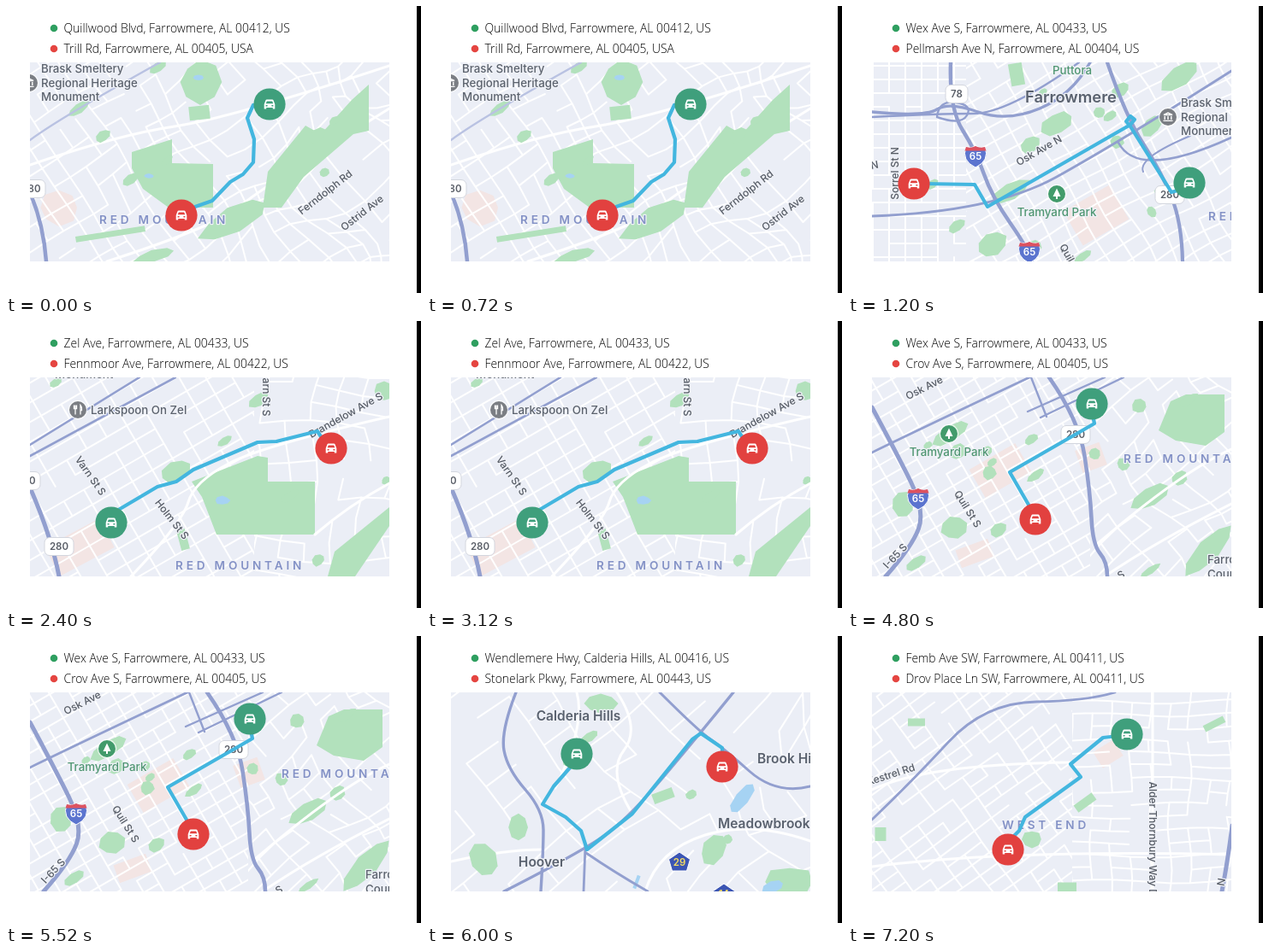
Animation, 485 px wide and 336 px high, one loop 8 s. Source, as an HTML page:

```html
<!DOCTYPE html>
<html lang="en">
<head>
<meta charset="utf-8">
<title>Trips</title>
<style>
  html, body { margin: 0; width: 100%; height: 100%; overflow: hidden; background: #fff; }
  svg { display: block; width: 100vw; height: 100vh; }
  .scene { visibility: hidden; }
  .scene.on { visibility: visible; }
  .head { font: 300 13.9px "Open Sans", sans-serif; fill: #000; }
  .label {
    font: 500 13.3px Inter, sans-serif; fill: #5b626d;
    paint-order: stroke; stroke: #eff1f7; stroke-width: 2.5px; stroke-linejoin: round;
  }
  .area { font-weight: 600; font-size: 13.6px; fill: #8391c6; letter-spacing: .28em; }
  .green { fill: #4f9672; }
  .town { font-weight: 600; font-size: 15.5px; fill: #59616e; }
  .city { font-weight: 600; font-size: 18.4px; fill: #59616e; }
  .street { font-size: 12px; fill: #555b65; text-anchor: middle; }
  .mid { text-anchor: middle; }
  .badge { font: 600 11.5px Inter, sans-serif; text-anchor: middle; }
  .line { fill: none; stroke-linejoin: round; stroke-linecap: round; }
</style>
</head>
<body>
<svg id="stage" viewBox="0 0 485 336">
  <defs>
    <clipPath id="frame"><path d="M28 66H448V299H28Z"/></clipPath>
    <path id="car" fill="#fff" fill-rule="evenodd" d="M-6.3 0L-4.6-4.4Q-4.2-5.4-3.2-5.4H3.2Q4.2-5.4 4.6-4.4L6.3 0V5.6H3.8V4H-3.8V5.6H-6.3ZM-4.3-.8H4.3L3.2-3.6H-3.2ZM-4.4 1V2.6H-2.4V1ZM2.4 1V2.6H4.4V1Z"/>
    <path id="tree" fill="#fff" d="M0-6.5L4.5 3H1V6H-1V3H-4.5Z"/>
    <path id="museum" fill="none" stroke="#fff" stroke-width="1.4" d="M-5-2.5L0-5L5-2.5ZM-3.8-1V3M0-1V3M3.8-1V3M-5.5 4.4H5.5"/>
    <path id="food" fill="none" stroke="#fff" stroke-width="1.3" d="M-4.5-5.5V-1.5H-1.5V-5.5M-3-5.5V5.5M3 5.5V-5.5Q5-3 4.5 .5H3"/>
    <path id="clinic" fill="none" stroke="#fff" stroke-width="1.4" d="M-4.5-5V-2Q-4.5 1-2.2 1T0-2V-5M-2.2 1Q-2 5 1.2 5T4 1V-3"/>
  </defs>
  <path d="M480 0H485V336H480Z"/>
</svg>
<script>
const LOOP = 8000, HOLD = 1200;
const PARK = '#b2e1bc', PINK = '#f3e5e4', WATER = '#a6d3f3', GREEN = '#3f9f7c', RED = '#e2413f';

function seeded(seed) {
  return () => {
    seed = Math.sin(seed * 12.9898 + 4.1) * 43758.5453;
    return seed -= Math.floor(seed);
  };
}

// Ground
const shape = (points, fill = PARK) => `<path fill="${fill}" d="M${points}Z"/>`;
const block = (x, y, w, h, turn = 0, fill = PARK) =>
  `<rect x="${-w / 2}" y="${-h / 2}" width="${w}" height="${h}" fill="${fill}" transform="translate(${x} ${y}) rotate(${turn})"/>`;
function blob(x, y, w, h, turn = 0, fill = PARK) {
  const rnd = seeded(x + y), pts = [];
  for (let a = 0; a < 8; a++) {
    const r = .5 + .12 * rnd(), t = a * Math.PI / 4;
    pts.push([w * r * Math.cos(t), h * r * Math.sin(t)].map(v => v.toFixed(1)));
  }
  return `<g transform="translate(${x} ${y}) rotate(${turn})">${shape(pts.join(' '), fill)}</g>`;
}
function groves(count, seed, turn = -35) {
  const rnd = seeded(seed);
  return Array.from({ length: count }, () =>
    blob(28 + 420 * rnd(), 66 + 233 * rnd(), 9 + 16 * rnd(), 6 + 9 * rnd(), turn)).join('');
}

// Lattice of streets whose bends grow towards the right, with some blocks left open.
function streets(turn, dx, dy, { keep = .88, bend = 0, from = 28, to = 448 } = {}) {
  const rnd = seeded(dx + dy + turn), cos = Math.cos(turn * Math.PI / 180), sin = Math.sin(turn * Math.PI / 180);
  const at = (i, j) => {
    const u = i * dx, v = j * dy, x = 238 + u * cos - v * sin, y = 182 + u * sin + v * cos;
    const k = bend * Math.max(0, x - 28) / 420;
    return (x + k * Math.sin(j * .9 + i * .4)).toFixed(1) + ' ' + (y + k * Math.sin(i * .8 - j * .5)).toFixed(1);
  };
  const nx = Math.ceil(250 / dx), ny = Math.ceil(250 / dy);
  let d = '';
  for (let i = -nx; i < nx; i++) for (let j = -ny; j < ny; j++) {
    if (rnd() < keep) d += `M${at(i, j)}L${at(i + 1, j)}`;
    if (rnd() < keep) d += `M${at(i, j)}L${at(i, j + 1)}`;
  }
  return `<svg x="${from}" y="66" width="${to - from}" height="233" viewBox="${from} 66 ${to - from} 233">
    <path class="line" stroke="#fff" stroke-width="2" d="${d}"/></svg>`;
}

// Lines; roads round off their key points.
const stroke = (d, color, w) => `<path class="line" stroke="${color}" stroke-width="${w}" d="${d}"/>`;
function road(points, w = 3.4, color = '#929fcf') {
  const p = points.split(' ').map(s => s.split(',').map(Number));
  let d = 'M' + p[0];
  for (let i = 1; i < p.length - 1; i++) {
    const k = i < p.length - 2 ? .5 : 1;
    d += `Q${p[i]} ${p[i].map((v, n) => v + (p[i + 1][n] - v) * k)}`;
  }
  return stroke(p.length > 2 ? d : 'M' + points, color, w);
}
const lane = points => road(points, 3, '#fff');
const route = points => stroke('M' + points, '#43b6df', 4.2);

// Text and signs
const label = (x, y, text, kind = '') => text.split('|').map((row, i) =>
  `<text class="label ${kind}" x="${x}" y="${y + i * 16.7}">${row}</text>`).join('');
const street = (x, y, turn, text) =>
  `<text class="label street" y="4.3" transform="translate(${x} ${y}) rotate(${turn})">${text}</text>`;
const disc = (x, y, r, fill, icon) =>
  `<g transform="translate(${x} ${y})"><circle r="${r}" fill="${fill}"/><use href="#${icon}"/></g>`;
const pin = ([x, y], fill) => disc(x, y, 18.6, fill, 'car');
const poi = (x, y, icon) => `<circle cx="${x}" cy="${y}" r="11.2" fill="#fff" opacity=".7"/>` +
  disc(x, y, 10, icon === 'tree' ? '#429b6b' : '#7b7e84', icon);
const garden = (x, y) => poi(x, y, 'tree') + label(x, y + 25.5, 'Tramyard Park', 'mid green');
const clinic = (x, y, text) => poi(x, y, 'clinic') + label(x, y + 25.5, text, 'mid');
const badge = (x, y, text, fill, back) =>
  `<g transform="translate(${x} ${y})">${back}<text class="badge" y="4.2" fill="${fill}">${text}</text></g>`;
const highway = (x, y, text) => {
  const w = text.length * 4 + 5;
  return badge(x, y, text, '#5a5f68',
    `<rect x="${-w}" y="-10.5" width="${2 * w}" height="21" rx="6" fill="#fff" stroke="#d3d6de"/>`);
};
const interstate = (x, y) => badge(x, y + 1, '65', '#fff',
  '<path fill="#5b74cf" stroke="#fff" d="M-11-11Q-5-9 0-12Q5-9 11-11Q17 5 0 13Q-17 5-11-11Z"/>' +
  '<path fill="#dd5260" d="M-11-11Q-5-9 0-12Q5-9 11-11L12.5-6.5H-12.5Z"/>');
const county = (x, y, text) => badge(x, y, text, '#f4dc62',
  '<path fill="#3c56b4" stroke="#fff" d="M0-12L12.5-3.5L8.5 10H-8.5L-12.5-3.5Z"/>');

const scenes = [
  {
    from: 'Quillwood Blvd, Farrowmere, AL 00412, US', to: 'Trill Rd, Farrowmere, AL 00405, USA',
    start: [308, 115], end: [205, 245],
    way: '289,116 282,131 290,156 289,183 277,197 262,206 241,228 221,235',
    map: [
      blob(62, 236, 40, 36, 0, PINK), streets(-33, 21, 25, { keep: .74, bend: 15 }),
      lane('28,186 134,150 260,132 448,70'), lane('118,299 245,258 300,212 448,120'),
      shape('147,171 194,156 194,184 242,185 242,236 190,236 160,214 147,190'),
      blob(227, 89, 42, 44), block(226, 125, 24, 16, -6),
      shape('424,92 424,146 406,150 348,200 322,236 300,236 306,194 350,140 368,150 404,110'),
      blob(266, 250, 78, 26, -28), block(122, 267, 82, 7, -9), blob(172, 293, 42, 12, -15),
      groves(8, 5), blob(225, 84, 11, 6, 0, WATER), blob(167, 199, 10, 5, 0, WATER),
      road('28,157 63,131 180,66', 2.4, '#b9c2e2'), road('28,218 44,256 47,299', 4.5),
      highway(33, 214, '80'), poi(27, 90, 'museum'), label(41, 78, 'Brask Smeltery|Regional Heritage|Monument'),
      label(109, 255, 'RED MOUNTAIN', 'area'), street(373, 218, -38, 'Ferndolph Rd'), street(416, 242, -38, 'Ostrid Ave')
    ]
  },
  {
    from: 'Wex Ave S, Farrowmere, AL 00433, US', to: 'Pellmarsh Ave N, Farrowmere, AL 00404, US',
    start: [399, 207], end: [77, 208],
    way: '392,214 378,218 330,141 325,135 330,129 335,133 330,139 163,235 148,209 88,208',
    map: [
      block(290, 245, 62, 46, -30, PINK), streets(0, 19, 16, { to: 138 }), streets(-30, 23, 18, { from: 138, bend: 4 }),
      blob(244, 138, 34, 22, -28), blob(190, 217, 44, 18, -30), blob(168, 279, 34, 24, -30),
      block(197, 80, 16, 26, -10), blob(388, 82, 48, 20, -38), blob(356, 140, 28, 16, -50), groves(12, 8),
      road('28,124 90,130 118,112 186,136 262,104 283,66'), road('28,130 106,126 186,126 270,66', 2.4),
      road('104,130 106,110 146,116 132,140 104,130', 2.4), road('120,66 118,120 150,171 168,223 211,285 215,299', 4.4),
      road('28,246 170,241 316,160 448,76', 2.8), road('316,160 339,204 448,154', 2.6), road('345,194 338,178 400,152', 2),
      road('303,66 325,130 366,194 390,253 391,299', 4.2),
      highway(127, 103, '78'), interstate(149, 175), interstate(212, 287), highway(376, 221, '280'),
      label(262, 80, 'Puttora', 'mid green'), label(207, 113, 'Farrowmere', 'city'),
      poi(374, 130, 'museum'), label(389, 118, 'Brask Smeltery|Regional|Monument'), garden(244, 220),
      street(55, 196, -90, 'Sorrel St N'), street(31, 186, -10, 'N'), street(223, 169, -30, 'Osk Ave N'),
      street(256, 289, 60, 'Quil'), label(421, 251, 'RED MOUNTAIN', 'area')
    ]
  },
  {
    from: 'Zel Ave, Farrowmere, AL 00433, US', to: 'Fennmoor Ave, Farrowmere, AL 00422, US',
    start: [123, 236], end: [380, 149],
    way: '123,226 177,194 199,188 219,174 294,142 316,141 364,129 371,140',
    map: [
      block(86, 265, 72, 38, -28, PINK), streets(-30, 27, 20, { to: 290 }),
      streets(3, 30, 22, { keep: .7, bend: 8, from: 290 }),
      shape('217,188 294,158 306,160 306,188 361,188 361,250 246,250 229,206'),
      blob(198, 176, 34, 20, -28), block(207, 256, 10, 24, -15),
      shape('376,299 384,270 448,218 448,240 408,299'), blob(442, 82, 22, 20), groves(6, 3),
      blob(253, 210, 15, 9, 0, WATER), lane('146,299 206,236 220,188 300,146 448,112'), lane('361,250 400,216 448,190'),
      road('28,158 198,66', 2.6), road('28,145 156,66', 2.6), road('28,195 53,252 62,299', 5),
      highway(27, 187, '80'), highway(62, 264, '280'), label(57, 67, 'Monument'),
      poi(84, 104, 'food'), label(99, 109, 'Larkspoon On Zel'), street(99, 181, 55, 'Varn St S'),
      street(194, 232, 52, 'Holm St S'), street(304, 89, 90, 'arn St S'), street(397, 110, -29, 'Brandelow Ave S'),
      label(198, 291, 'RED MOUNTAIN', 'area')
    ]
  },
  {
    from: 'Pryn St S, Farrowmere, AL 00433', to: 'Osk Ave S, Farrowmere, AL',
    start: [279, 174], end: [204, 206], way: '204,206 279,174',
    map: [
      block(284, 198, 92, 62, -30, PINK), streets(-30, 31, 22, { keep: .92 }),
      block(177, 124, 92, 20, -31), blob(44, 238, 28, 56, 15), blob(199, 291, 42, 22, -30), blob(403, 249, 30, 26, -30),
      blob(202, 74, 28, 10, -25), groves(7, 11),
      road('28,162 204,66', 2.8), road('28,174 96,134', 2), road('28,113 75,212 100,250 118,299', 6),
      road('28,113 75,212 100,250 118,299', 1, '#c6cdea'), road('372,66 378,88 448,66', 2.4), road('369,80 410,66', 2.4),
      interstate(111, 262), highway(426, 78, '280'), clinic(275, 89, 'VEQ Wellness|Prompt Care'), garden(177, 123),
      label(158, 168, 'Crumpet Barn'), poi(261, 163, 'food'), clinic(286, 227, 'Tellavan Eye|Treatment|Hospital'),
      street(399, 127, 60, 'Melk St S'), street(385, 293, 60, 'Jas')
    ]
  },
  {
    from: 'Wex Ave S, Farrowmere, AL 00433, US', to: 'Crov Ave S, Farrowmere, AL 00405, US',
    start: [285, 97], end: [219, 232], way: '285,105 288,120 189,177 215,222',
    map: [
      block(178, 175, 62, 38, -30, PINK), block(284, 160, 30, 28, -20, PINK), block(148, 272, 40, 22, -20, PINK),
      streets(-30, 21, 16, { to: 283 }), streets(-38, 25, 21, { keep: .68, bend: 11, from: 283 }),
      shape('377,94 395,86 440,86 440,130 418,146 383,140 363,128'), blob(120, 132, 42, 16, -30),
      blob(64, 215, 24, 28, -20), blob(124, 242, 28, 24, -20), blob(353, 206, 44, 20, -30), blob(422, 268, 72, 22, -48),
      groves(16, 21), lane('290,262 390,176 448,150'), lane('300,299 360,258 448,214'),
      road('28,154 64,136 212,66', 2.8), road('210,106 300,66', 2.4), road('225,113 322,66', 2.4), road('214,66 232,112', 2.4),
      road('28,101 57,155 90,222 75,264 44,299', 5), road('235,66 270,116 283,200 286,262 303,282 303,299', 4.6),
      interstate(82, 207), highway(266, 133, '280'), garden(118, 132),
      street(89, 78, -27, 'Osk Ave'), street(140, 220, 58, 'Quil St S'), street(55, 275, -47, 'I-65 S'), street(319, 297, -30, 'S'),
      label(322, 166, 'RED MOUNTAIN', 'area'), label(420, 284, 'Farrowmere|Court')
    ]
  },
  {
    from: 'Wendlemere Hwy, Calderia Hills, AL 00416, US', to: 'Stonelark Pkwy, Farrowmere, AL 00443, US',
    start: [175, 138], end: [345, 153],
    way: '175,145 148,176 135,197 162,212 180,228 187,250 240,208 310,121 320,114 345,131 345,150',
    map: [
      streets(-38, 44, 36, { keep: .42, bend: 24 }), lane('175,66 186,104 150,178'), lane('222,66 250,108 210,160 240,208'),
      lane('255,299 270,250 380,216 448,240'), lane('28,264 90,250 136,250'),
      blob(203, 79, 34, 20), blob(107, 224, 20, 28), blob(66, 262, 28, 38, -30), block(276, 187, 25, 12, -20),
      blob(335, 250, 24, 34, 35), blob(424, 288, 52, 32), groves(4, 9),
      blob(368, 190, 38, 14, -52, WATER), blob(404, 294, 24, 12, -20, WATER), block(245, 288, 4, 16, 20, WATER),
      road('104,66 86,112 94,156 136,204 136,250 133,299'), road('90,299 190,248 240,208 316,118 358,66'),
      road('272,66 318,112 345,130 408,186 448,176', 3), road('185,246 183,299', 2.8), road('186,254 218,276 258,299', 2.8),
      county(295, 265, '29'), county(347, 302, '14'),
      label(177, 99, 'Calderia Hills', 'mid town'), label(134, 270, 'Hoover', 'mid town'),
      label(386, 149, 'Brook Highland', 'town'), label(340, 225, 'Meadowbrook', 'town')
    ]
  },
  {
    from: 'Femb Ave SW, Farrowmere, AL 00411, US', to: 'Drov Place Ln SW, Farrowmere, AL 00411, US',
    start: [326, 115], end: [187, 250],
    way: '325,116 298,119 260,150 272,165 207,212 200,228 188,240',
    map: [
      block(304, 138, 28, 22, -32, PINK), streets(-36, 25, 15, { keep: .72, bend: 3, to: 262 }),
      streets(0, 23, 15, { keep: .7, bend: 3, from: 262 }),
      block(80, 101, 20, 9), block(428, 103, 26, 8, -27), block(277, 195, 26, 10, -36), block(38, 232, 13, 16),
      blob(215, 238, 20, 18), block(256, 294, 22, 11),
      lane('28,180 90,150 260,148'), lane('356,66 356,299'), lane('28,270 187,250 448,256'),
      road('28,215 75,170 160,78 280,76 312,66', 2.8), road('449,222 444,262 437,299', 5),
      label(180, 226, 'WEST END', 'area'), street(50, 162, -18, 'Kestrel Rd'),
      street(356, 240, 90, 'Alder Thornbury Way Dr'), street(436, 288, 100, 'N')
    ]
  }
];

const stage = document.getElementById('stage');
const heading = (y, fill, text) =>
  `<circle cx="56" cy="${y}" r="4.3" fill="${fill}"/><text class="head" x="67.5" y="${y + 5}">${text}</text>`;
stage.insertAdjacentHTML('beforeend', scenes.map(s => `<g class="scene">
  ${heading(26, '#2f9f60', s.from)}${heading(50, '#e54541', s.to)}
  <g clip-path="url(#frame)"><path fill="#ebeef6" d="M28 66H448V299H28Z"/>
  ${s.map.join('')}${route(s.way)}${pin(s.start, GREEN)}${pin(s.end, RED)}</g></g>`).join(''));

const layers = [...stage.querySelectorAll('.scene')];
let shown = -1;
function tick() {
  const now = Math.floor(performance.now() % LOOP / HOLD);
  if (now !== shown) {
    layers.forEach((layer, i) => layer.classList.toggle('on', i === now));
    shown = now;
  }
  requestAnimationFrame(tick);
}
tick();
</script>
</body>
</html>
```
